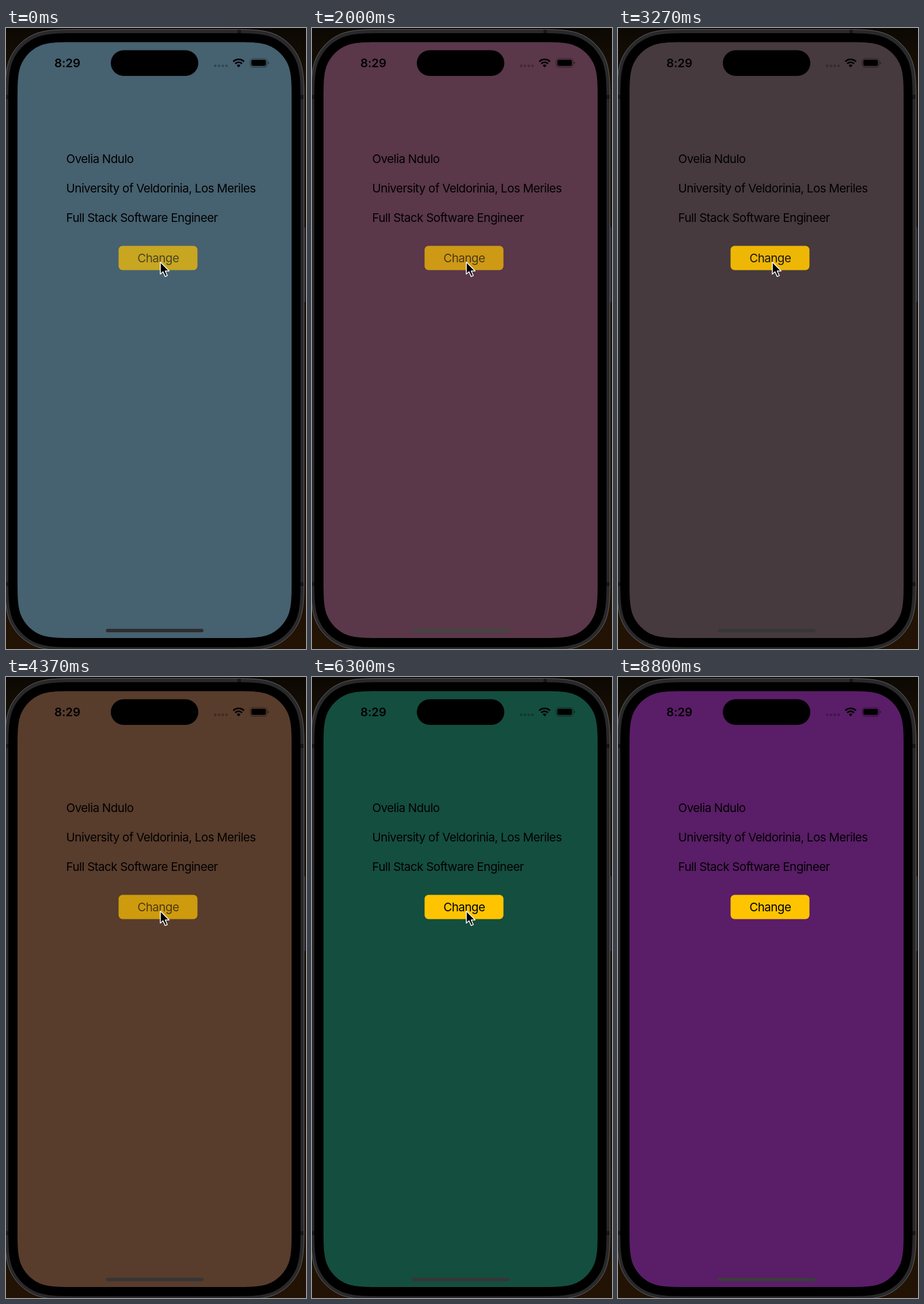
An HTML page that plays this animation: 521 by 1076 pixels, repeating every 8830 ms.

```html
<!DOCTYPE html>
<html lang="en">
<head>
<meta charset="utf-8">
<title>Change background</title>
<style>
  html, body { margin: 0; width: 100%; height: 100%; overflow: hidden; background: #080603; }
  svg { display: block; width: 100vw; height: 100vh; }
  text { font: 400 20.6px Inter, Roboto, sans-serif; font-optical-sizing: none; letter-spacing: -.57px; }
  .time { font-weight: 600; letter-spacing: -.2px; }
</style>
</head>
<body>
<svg viewBox="0 0 521 1076">
  <defs>
    <linearGradient id="leaves" x2="0" y2="1">
      <stop offset="0" stop-color="#0c0803"/>
      <stop offset=".1" stop-color="#1d1305"/>
      <stop offset=".6" stop-color="#1a1006"/>
      <stop offset="1" stop-color="#221304"/>
    </linearGradient>
  </defs>
  <rect width="521" height="1076" fill="url(#leaves)"/>

  <!-- phone body -->
  <rect x="516" y="345" width="4" height="130" rx="1.5" fill="#2b2c34"/>
  <path id="body" fill="#29292b" stroke="#606062"/>
  <g fill="#171719">
    <rect x="402" y="3" width="6" height="7"/>
    <rect x="-1" y="116" width="6" height="7"/>
    <rect x="-1" y="960" width="6" height="7"/>
    <rect x="511" y="116" width="6" height="7"/>
    <rect x="511" y="960" width="6" height="7"/>
  </g>
  <path id="bezel"/>

  <!-- screen -->
  <path id="screen"/>
  <rect x="182" y="38.500" width="152" height="44.500" rx="22.250"/>
  <text class="time" x="84" y="68">8:29</text>
  <g opacity=".27">
    <circle cx="363.500" cy="65.500" r="2.200"/>
    <circle cx="370" cy="65.500" r="2.200"/>
    <circle cx="376.500" cy="65.500" r="2.200"/>
    <circle cx="383" cy="65.500" r="2.200"/>
  </g>
  <g fill="none" stroke="#000" stroke-width="2.700">
    <path d="M394.700 58.200a13.300 13.300 0 0 1 18.600 0"/>
    <path d="M398 61.900a8.500 8.500 0 0 1 12 0"/>
  </g>
  <path d="M400.700 64.700a4.700 4.700 0 0 1 6.600 0L404 68.200z"/>
  <rect x="424" y="53" width="29.500" height="14.800" rx="4.600" fill="none" stroke="#000" stroke-opacity=".42" stroke-width="1.200"/>
  <rect x="426" y="55" width="25.500" height="10.800" rx="3"/>
  <path d="M455 58q1.800.7 1.800 2.500t-1.800 2.500z" opacity=".45"/>

  <text x="104.600" y="234">Ovelia Ndulo</text>
  <text x="104.600" y="285">University of Veldorinia, Los Meriles</text>
  <text x="104.600" y="336">Full Stack Software Engineer</text>

  <g id="button">
    <rect x="195.500" y="377.500" width="137" height="42" rx="7" fill="#ffc400"/>
    <text id="label" x="264.300" y="406" text-anchor="middle">Change</text>
  </g>

  <rect id="homeBar" x="173.500" y="1041" width="169.500" height="6" rx="3"/>
  <path id="cursor" d="M268 405.500v21l4.700-4.300 3.700 8.400 3.700-1.600-3.600-8h6.800z" stroke="#fff" stroke-width="1.500" stroke-linejoin="round"/>
</svg>
<script>
const LOOP = 8830;
// Each tap: press time, release time, screen colour after release.
const TAPS = [
  [-1000, 30, [7, 20, 101]],
  [970, 2000, [90, 55, 73]],
  [2300, 2600, [62, 62, 72]],
  [2900, 3200, [70, 58, 62]],
  [3500, 3800, [88, 60, 44]],
  [4170, 5000, [23, 66, 90]],
  [5310, 5970, [20, 78, 62]],
  [6310, 6550, [56, 56, 74]],
  [6870, 7400, [90, 29, 103]]
];
const START_COLOR = [70, 97, 112];
const PRESSED = 0.7;
const LEAVE = [7970, 8270];

const [body, bezel, screenEl, button, label, homeBar, cursor] =
  ['body', 'bezel', 'screen', 'button', 'label', 'homeBar', 'cursor'].map(id => document.getElementById(id));
const clamp = v => Math.min(1, Math.max(0, v));
const rgb = c => `rgb(${c.map(Math.round).join()})`;
const barShade = ([r, g, b]) => 76 - 0.34 * (0.2126 * r + 0.7152 * g + 0.0722 * b);

// Rectangle with continuous-curvature corners, from left, top, right, bottom.
function smoothRect(l, t, r, b, radius) {
  const half = [[0, 1.529], [0, 1.088], [0, 0.868], [0.075, 0.631], [0.169, 0.373]];
  const corner = [...half, ...half.map(([u, v]) => [v, u]).reverse()];
  const place = (x, y, sx, sy) => corner.map(([u, v]) => `${x + sx * u * radius} ${y + sy * v * radius}`);
  const corners = [
    place(l, t, 1, 1), place(r, t, -1, 1).reverse(),
    place(r, b, -1, -1), place(l, b, 1, -1).reverse()
  ];
  return 'M' + corners.map(([start, ...rest]) => `${start}C${rest.join(' ')}`).join('L') + 'z';
}

function buttonOpacity(t) {
  const [down, up] = TAPS.filter(tap => tap[0] <= t).pop();
  return t < up
    ? PRESSED + (1 - PRESSED) * Math.exp((down - t) / 24)
    : 1 - (1 - PRESSED) * Math.exp((up - t) / 60);
}

function draw(t) {
  const done = TAPS.filter(tap => tap[1] <= t);
  const last = done[done.length - 1];
  const color = last ? last[2] : START_COLOR;
  const before = done.length > 1 ? done[done.length - 2][2] : START_COLOR;
  const settle = last ? clamp((t - last[1]) / 400) : 1;
  const shade = barShade(before) + (barShade(color) - barShade(before)) * settle;
  const opacity = buttonOpacity(t);

  screenEl.setAttribute('fill', rgb(color));
  homeBar.setAttribute('fill', rgb([shade, shade, shade]));
  button.setAttribute('opacity', opacity);
  label.setAttribute('opacity', opacity);

  const p = clamp((t - LEAVE[0]) / (LEAVE[1] - LEAVE[0]));
  const eased = p * p * (3 - 2 * p);
  cursor.setAttribute('transform', `translate(${270 * eased} ${40 * eased})`);
}

body.setAttribute('d', smoothRect(-1.5, 2.5, 517.5, 1078.5, 87));
bezel.setAttribute('d', smoothRect(4, 9, 511.5, 1073, 82));
screenEl.setAttribute('d', smoothRect(20, 24.5, 496, 1057, 66.6));

const begin = performance.now();
function tick(now) {
  draw(Math.max(0, now - begin) % LOOP);
  requestAnimationFrame(tick);
}
draw(0);
requestAnimationFrame(tick);
</script>
</body>
</html>
```
